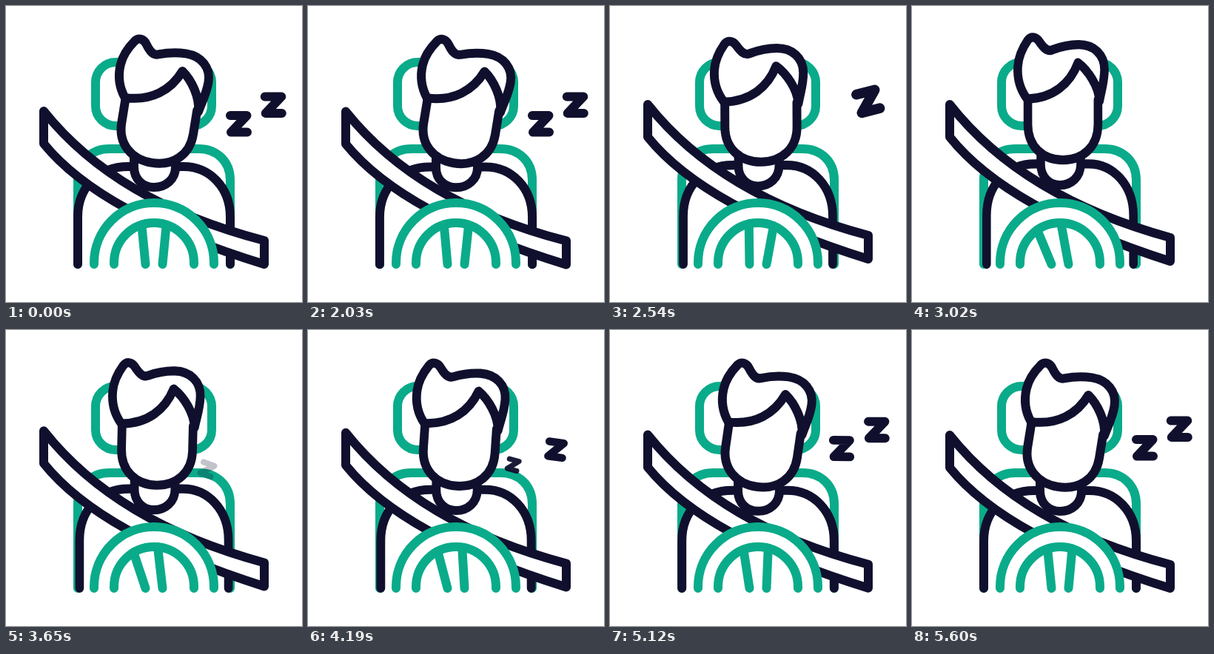
These frames come from a looping animation (400x400 px, 5.63 s). An HTML page with a canvas:

```html
<!DOCTYPE html>
<html lang="en">
<head>
<meta charset="utf-8">
<title>Sleepy driver</title>
<style>
  html, body { margin: 0; width: 100%; height: 100%; overflow: hidden; background: #fff; }
  canvas { display: block; width: 400px; height: 400px; }
</style>
</head>
<body>
<canvas id="stage" width="400" height="400"></canvas>
<script>
const ctx = document.getElementById('stage').getContext('2d');
const LOOP = 5630, HOLD = 2030, STEP = 30;
const DARK = '#10102e', GREEN = '#0aab8a', LINE = 12;

const linear = p => p;
const smooth = p => p * p * (3 - 2 * p);
const sineOut = p => Math.sin(p * Math.PI / 2);
const mix = (a, b, p) => a + (b - a) * p;
const clamp = p => Math.min(1, Math.max(0, p));
const rad = deg => deg * Math.PI / 180;

// Keys are [time, value, ease into this key].
const tracks = {
  headTurn: [[2000, 9.2], [2130, 10.2], [2450, -0.3], [3020, 0], [LOOP, 9.2]],
  headDrop: [[2000, 2.3], [2150, 6], [2850, -3.2], [LOOP, 2.3, sineOut]],
  headWidth: [[2400, 1], [2900, 0.965], [LOOP, 1, sineOut]],
  bodyWidth: [[2000, 1], [2130, 1.005], [2900, 0.96], [LOOP, 1, sineOut]],
  bodyDrop: [[2000, 0], [2150, 3], [2400, 0]],
  beltLeft: [[2000, 0], [2150, 4], [2500, -9], [3020, -9], [LOOP, 0, sineOut]],
  beltRight: [[2000, 0], [2150, 4], [2500, -7], [3020, -4], [LOOP, 0, sineOut]],
  wheelTurn: [[2000, 0], [2300, 17], [2900, -17.5], [LOOP, 0, linear]]
};

function valueAt(name, t) {
  const keys = tracks[name];
  if (t <= keys[0][0]) return keys[0][1];
  for (let i = 1; i < keys.length; i++) {
    const [t0, v0] = keys[i - 1], [t1, v1, ease = smooth] = keys[i];
    if (t <= t1) return mix(v0, v1, ease((t - t0) / (t1 - t0)));
  }
  return keys[keys.length - 1][1];
}

const shapes = {
  backrest: new Path2D('M97 349V235C97 210 115 193 140 193H260C285 193 303 210 303 235V349'),
  torso: new Path2D('M97 349V285C97 245 125 217 165 217H240C275 217 303 245 303 285V349'),
  neck: new Path2D('M173 206V218C173 234 185 245 200 245C216 245 229 234 229 218V206'),
  face: new Path2D('M155 128V163C155 192 176 210 204 210C232 210 253 192 253 163V130'),
  hair: new Path2D('M154 129C143 115 140 100 141 86C142 70 150 58 155 51' +
    'C160 45 167 47 171 53C176 60 182 67 189 64C200 60 212 57 226 57' +
    'C247 57 262 70 262 90C262 106 258 116 255 132C254 112 239 91 225 81' +
    'C214 109 190 128 154 129Z'),
  zed: new Path2D('M-11.5 -11.3H11L-10.5 11.3H11.5')
};
const headrest = new Path2D();
headrest.roundRect(121, 76, 157, 86, 27);

function paint(path, color, fill) {
  if (fill) {
    ctx.fillStyle = '#fff';
    ctx.fill(path);
  }
  ctx.strokeStyle = color;
  ctx.stroke(path);
}

function drawBody(t) {
  const sx = valueAt('bodyWidth', t);
  ctx.save();
  ctx.translate(200, 349 + valueAt('bodyDrop', t));
  ctx.scale(sx, 1 + (1 - sx) * 0.75);
  ctx.translate(-200, -349);
  paint(shapes.torso, DARK, true);
  paint(shapes.neck, DARK, true);
  ctx.restore();
}

function drawBelt(t) {
  const left = valueAt('beltLeft', t), right = valueAt('beltRight', t);
  const mid = mix(left, right, 0.4);
  const belt = new Path2D();
  belt.moveTo(51, 142 + left);
  belt.quadraticCurveTo(149, 265 + mid, 349, 317 + right);
  belt.lineTo(349, 349 + right);
  belt.quadraticCurveTo(128, 281 + mid, 51, 186 + left);
  belt.closePath();
  paint(belt, DARK, true);
}

function drawHead(t) {
  const sx = valueAt('headWidth', t);
  ctx.save();
  ctx.translate(203, 167 + valueAt('headDrop', t));
  ctx.rotate(rad(valueAt('headTurn', t)));
  ctx.scale(sx, 1 + (1 - sx) * 0.6);
  ctx.translate(-203, -167);
  paint(shapes.face, DARK, true);
  paint(shapes.hair, DARK, true);
  ctx.restore();
}

function arch(r) {
  const path = new Path2D();
  path.moveTo(200 - r, 349);
  path.arc(200, 347, r, Math.PI, 0);
  path.lineTo(200 + r, 349);
  return path;
}

// The spokes stay put at the hub while their tops slide along the inner arch.
function drawWheel(t) {
  const turn = valueAt('wheelTurn', t);
  paint(arch(81), GREEN, true);
  for (const side of [-1, 1]) {
    const angle = rad(turn + 18 * side);
    const spoke = new Path2D();
    spoke.moveTo(200 + 54 * Math.sin(angle), 347 - 54 * Math.cos(angle));
    spoke.lineTo(200 + 11.5 * side, 349);
    paint(spoke, GREEN);
  }
  paint(arch(54), GREEN);
}

const zeds = [
  { rest: [314.5, 159.3], from: [260, 193], bend: [287, 176], born: 4000, small: 0.6,
    leave: 2130, gone: 2900, to: [377, 104] },
  { rest: [361.3, 133.7], from: [262, 190], bend: [330, 180], born: 3600, small: 0.35,
    leave: 2030, gone: 2500, to: [386, 50] }
];

function drawZed(z, t) {
  let x, y, turn, size, alpha;
  if (t < z.gone) {
    const p = clamp((t - z.leave) / (z.gone - z.leave)), e = smooth(p);
    x = mix(z.rest[0], z.to[0], e);
    y = mix(z.rest[1], z.to[1], e);
    turn = -26 * e;
    size = 1 + 0.25 * e;
    alpha = clamp((1 - p) / 0.3);
  } else if (t > z.born) {
    const left = (1 - (t - z.born) / (5600 - z.born)) ** 3, u = 1 - Math.max(0, left);
    const along = i => mix(mix(z.from[i], z.bend[i], u), mix(z.bend[i], z.rest[i], u), u);
    x = along(0);
    y = along(1);
    turn = 22 * (1 - u);
    size = 1 - z.small * (1 - u);
    alpha = clamp((t - z.born) / 200);
  } else return;
  ctx.save();
  ctx.globalAlpha = alpha;
  ctx.translate(x, y);
  ctx.rotate(rad(turn));
  ctx.scale(size, size);
  paint(shapes.zed, DARK);
  ctx.restore();
}

function draw(t) {
  ctx.fillStyle = '#fff';
  ctx.fillRect(0, 0, 400, 400);
  ctx.lineWidth = LINE;
  ctx.lineCap = ctx.lineJoin = 'round';
  paint(headrest, GREEN);
  paint(shapes.backrest, GREEN);
  drawBody(t);
  drawBelt(t);
  drawHead(t);
  drawWheel(t);
  zeds.forEach(z => drawZed(z, t));
}

function frame() {
  const t = performance.now() % LOOP;
  draw(t < HOLD ? 0 : HOLD + Math.floor((t - HOLD) / STEP) * STEP);
  requestAnimationFrame(frame);
}
frame();
</script>
</body>
</html>
```
